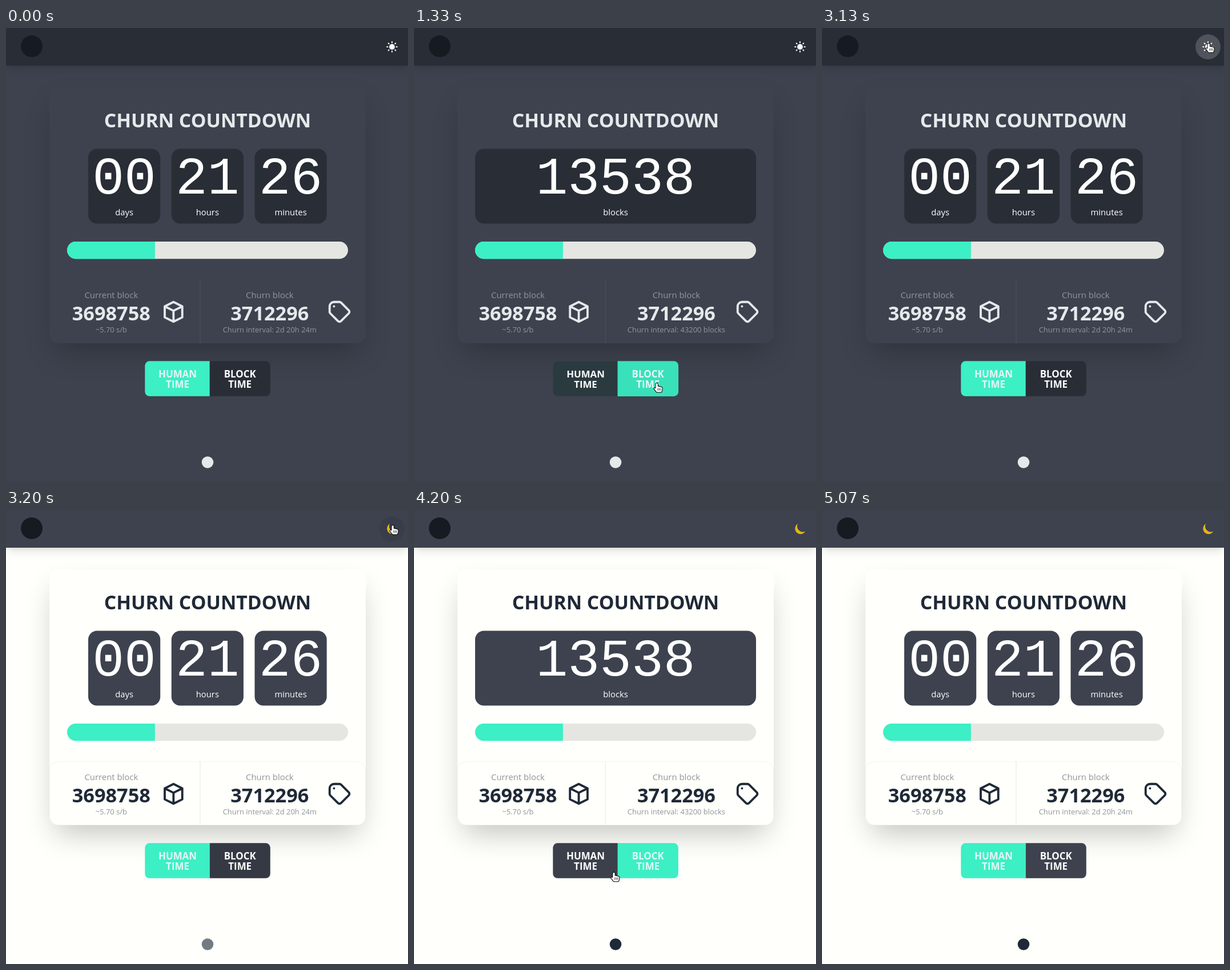
An HTML page with a canvas for the animation above (5870 ms loop, 704 by 795 pixels).

```html
<!DOCTYPE html>
<html lang="en">
<head>
<meta charset="utf-8">
<title>Churn countdown</title>
<style>
  html, body { margin: 0; width: 100%; height: 100%; overflow: hidden; background: #3d424e; }
  canvas { display: block; width: 704px; height: 795px; }
</style>
</head>
<body>
<canvas id="stage"></canvas>
<script>
const W = 704, H = 795, LOOP = 5870, STEP = 1000 / 15, FADE = 200;
const canvas = document.getElementById('stage');
const ctx = canvas.getContext('2d');
const dpr = window.devicePixelRatio || 1;
canvas.width = W * dpr;
canvas.height = H * dpr;

const SANS = '"Open Sans", "Noto Sans", sans-serif';
const MONO = '"Liberation Mono", monospace';
const TEAL = '#3cefc5';

const DARK = {
  page: '#3d424e', panel: '#292d35', hover: '#161c20',
  text: '#e5e9eb', divider: '#4c515c', ring: '#4f535b'
};
const LIGHT = {
  page: '#fffffb', panel: '#3d424e', hover: '#2f343e',
  text: '#1f2937', divider: '#e8e8e5', ring: '#383d49'
};

const THEME_AT = 3150;
const SWITCHES = [1215, 2182, 3790, 4720];

// The pointer rests between moves; sag bows the path downwards
const ENTER = { x: 163, y: 491 }, LEAVE_AT = 5050;
const MOVES = [
  { from: 266, to: 866, x: 425, y: 622, sag: 150 },
  { from: 1600, to: 1933, x: 322, y: 616, sag: 0 },
  { from: 2200, to: 2667, x: 677, y: 27, sag: 0 },
  { from: 3330, to: 3800, x: 415, y: 622, sag: 0 },
  { from: 4000, to: 4400, x: 328, y: 622, sag: 17 },
  { from: 4830, to: 5070, x: 345, y: 75, sag: 0 }
];

const CUBE = new Path2D('M20 7l-8-4-8 4m16 0l-8 4m8-4v10l-8 4m0-10L4 7m8 4v10M4 7v10l8 4');
const TAG = new Path2D('M7 7h.01M7 3h5c.512 0 1.024.195 1.414.586l7 7a2 2 0 010 2.828l-7 7' +
  'a2 2 0 01-2.828 0l-7-7A1.994 1.994 0 013 12V7a4 4 0 014-4z');
const MOON = new Path2D('M672 24.3A9.6 9.6 0 1 0 685.3 37.2A9.8 9.8 0 0 1 672 24.3z');
const HAND = new Path2D('M-1.5 1.6a1.7 1.7 0 0 1 3.4 0V6l1.6-.5 1 .9 1.6-.4 1 1h1.5l.9 1.2' +
  'V12l-1.5 3.6H0L-4.5 9.6l.8-1.4 2.2 1z');
const KNUCKLES = new Path2D('M2 9v3.5M4.5 9v3.5M7 9v3.5');
const ARROW = new Path2D('M0 0V16.5L4 12.8 6.6 18.6 9.2 17.4 6.7 11.8H12z');

const BUTTONS = [
  { word: 'HUMAN', x: 243.3, w: 113.5, radii: [8, 0, 0, 8], textX: 300.5 },
  { word: 'BLOCK', x: 356.8, w: 106, radii: [0, 8, 8, 0], textX: 409.7 }
];

const clamp = v => Math.min(1, Math.max(0, v));
const easeOut = (v, power) => 1 - (1 - clamp(v)) ** power;
const transition = (t, start) => easeOut((t - start) / FADE, 3);
const channels = hex => [1, 3, 5].map(i => parseInt(hex.slice(i, i + 2), 16));

function mix(a, b, k) {
  const to = channels(b);
  return '#' + channels(a)
    .map((v, i) => Math.round(v + (to[i] - v) * k).toString(16).padStart(2, '0')).join('');
}

function box(x, y, w, h, r, fill) {
  ctx.beginPath();
  ctx.roundRect(x, y, w, h, r);
  ctx.fillStyle = fill;
  ctx.fill();
}

function disc(x, y, r, fill) {
  ctx.beginPath();
  ctx.arc(x, y, r, 0, Math.PI * 2);
  ctx.fillStyle = fill;
  ctx.fill();
}

function shadow(x, y, w, h, r, dy, blur, spread, alpha) {
  const away = 2000;
  ctx.save();
  ctx.shadowColor = `rgba(0,0,0,${alpha})`;
  ctx.shadowBlur = blur * dpr;
  ctx.shadowOffsetX = away * dpr;
  ctx.shadowOffsetY = dy * dpr;
  box(x - spread - away, y - spread, w + 2 * spread, h + 2 * spread, r, '#000');
  ctx.restore();
}

function label(str, x, y, size, fill, weight = 400, family = SANS) {
  ctx.font = `${weight} ${size}px ${family}`;
  ctx.textAlign = 'center';
  ctx.fillStyle = fill;
  ctx.fillText(str, x, y);
}

function icon(path, x, y, color) {
  ctx.save();
  ctx.translate(x, y);
  ctx.scale(1.92, 1.92);
  ctx.lineWidth = 2;
  ctx.lineCap = ctx.lineJoin = 'round';
  ctx.strokeStyle = color;
  ctx.stroke(path);
  ctx.restore();
}

function pointerAt(t) {
  if (t < MOVES[0].from || t >= LEAVE_AT) return null;
  let { x, y } = ENTER;
  for (const m of MOVES) {
    if (t < m.from) break;
    const k = easeOut((t - m.from) / (m.to - m.from), 2);
    x += (m.x - x) * k;
    y += (m.y - y) * k + 4 * m.sag * k * (1 - k);
  }
  return { x, y };
}

const overButton = (p, b) => p.x > b.x && p.x < b.x + b.w && p.y > 583 && p.y < 645;
const overToggle = p => Math.hypot(p.x - 676, p.y - 33) < 22;

// Share of the last moments that the pointer spent inside a region
function hoverShare(t, inside) {
  const samples = 6;
  let hits = 0;
  for (let i = 0; i < samples; i++) {
    const p = pointerAt(t - i * FADE / samples);
    if (p && inside(p)) hits++;
  }
  return hits / samples;
}

function modeAt(t) {
  const past = SWITCHES.filter(s => s <= t);
  const since = past.length ? past[past.length - 1] : -LOOP;
  return { active: past.length % 2, since };
}

function header(t, theme, light) {
  shadow(0, 0, W, 66, 0, 10, 15, -3, 0.1);
  shadow(0, 0, W, 66, 0, 4, 6, -2, 0.06);
  box(0, 0, W, 66, 0, theme.panel);
  disc(45, 32, 19, '#161b21');
  disc(676, 33, 22, mix(theme.panel, theme.ring, hoverShare(t, overToggle)));
  if (light) {
    ctx.fillStyle = '#e3b41c';
    ctx.fill(MOON);
    return;
  }
  disc(676, 33, 4.9, '#fff');
  ctx.strokeStyle = '#fff';
  ctx.lineWidth = 2.1;
  ctx.lineCap = 'round';
  ctx.beginPath();
  for (let i = 0; i < 8; i++) {
    const c = Math.cos(i * Math.PI / 4), s = Math.sin(i * Math.PI / 4);
    ctx.moveTo(676 + 7.6 * c, 33 + 7.6 * s);
    ctx.lineTo(676 + 8.8 * c, 33 + 8.8 * s);
  }
  ctx.stroke();
}

function counter(x, w, value, unit, panel) {
  box(x, 211.5, w, 131, 15.4, panel);
  label(value, x + w / 2, 290.4, 93, '#fff', 400, MONO);
  label(unit, x + w / 2, 327.7, 14.8, '#fff');
}

function stat(x, name, value, note, theme) {
  const dim = mix(theme.page, theme.text, 0.5);
  label(name, x, 473, 14.9, dim);
  label(value, x, 512, 34.3, theme.text, 700);
  label(note, x, 532.8, 12.95, dim);
}

function card(theme, light, human) {
  shadow(76, 104, 554, 448, 4, 24, 52, -11.5, 0.25);
  box(76, 104, 554, 448, 15.4, theme.page);
  label('CHURN COUNTDOWN', 353, 173.8, 33.7, theme.text, 700);

  if (human) {
    [['00', 'days'], ['21', 'hours'], ['26', 'minutes']].forEach(([value, unit], i) =>
      counter(144 + 145.75 * i, 126.2, value, unit, theme.panel));
  } else {
    counter(107, 492, '13538', 'blocks', theme.panel);
  }

  box(107, 374, 492, 30.2, 15.1, '#e5e6e1');
  box(107, 374, 153.8, 30.2, [15.1, 0, 0, 15.1], TEAL);

  if (light) {
    ctx.beginPath();
    ctx.roundRect(76.5, 440.5, 553, 111, 15);
    ctx.strokeStyle = '#f2f2ee';
    ctx.lineWidth = 1;
    ctx.stroke();
  }
  // A longer interval text pushes the left column narrower
  const push = human ? 0 : 4.8;
  box(339.5 - push, 441, 1, 111, 0, theme.divider);
  stat(184.3 - push / 2, 'Current block', '3698758', '~5.70 s/b', theme);
  stat(461.8 - push / 2, 'Churn block', '3712296',
    'Churn interval: ' + (human ? '2d 20h 24m' : '43200 blocks'), theme);
  icon(CUBE, 270.3 - push, 474, theme.text);
  icon(TAG, 561, 474, theme.text);
}

function button(b, fill, ink, scale) {
  const cx = b.x + b.w / 2, cy = 614;
  ctx.save();
  ctx.translate(cx, cy);
  ctx.scale(scale, scale);
  ctx.translate(-cx, -cy);
  box(b.x, 583.3, b.w, 61.5, b.radii, fill);
  label(b.word, b.textX, 612.2, 16.9, ink, 700);
  label('TIME', b.textX, 629.6, 16.9, ink, 700);
  ctx.restore();
}

function buttons(t, theme, fade) {
  const { active, since } = modeAt(t);
  const panel = mix(DARK.panel, LIGHT.panel, fade);
  const gain = transition(t, since);
  const pulse = 0.01 * clamp(1 - (t - since) / 250);
  BUTTONS.forEach((b, i) => {
    const on = i === active;
    const share = on ? gain : 1 - gain;
    const base = mix(panel, theme.hover, hoverShare(t, p => overButton(p, b)));
    button(b, mix(base, TEAL, share), mix('#ffffff', '#e8f6f6', share), on ? 1 + pulse : 1 - pulse);
  });
}

function pointer(t) {
  const p = pointerAt(t);
  if (!p) return;
  const hand = overToggle(p) || BUTTONS.some(b => overButton(p, b));
  const shape = hand ? HAND : ARROW;
  ctx.save();
  ctx.translate(p.x, p.y);
  ctx.lineJoin = 'round';
  ctx.lineWidth = 2;
  ctx.strokeStyle = '#000';
  ctx.stroke(shape);
  ctx.fillStyle = '#fff';
  ctx.fill(shape);
  if (hand) {
    ctx.lineWidth = 0.8;
    ctx.stroke(KNUCKLES);
  }
  ctx.restore();
}

function draw(t) {
  const light = t >= THEME_AT;
  const theme = light ? LIGHT : DARK;
  const fade = transition(t, THEME_AT);
  ctx.setTransform(dpr, 0, 0, dpr, 0, 0);
  box(0, 0, W, H, 0, theme.page);
  card(theme, light, modeAt(t).active === 0);
  header(t, theme, light);
  buttons(t, theme, fade);
  disc(353, 760.5, 10.3, mix(DARK.text, LIGHT.text, fade));
  pointer(t);
}

const start = performance.now();
function tick() {
  const t = (performance.now() - start) % LOOP;
  draw(Math.floor((t + 4) / STEP) * STEP);
  requestAnimationFrame(tick);
}
tick();
</script>
</body>
</html>
```
